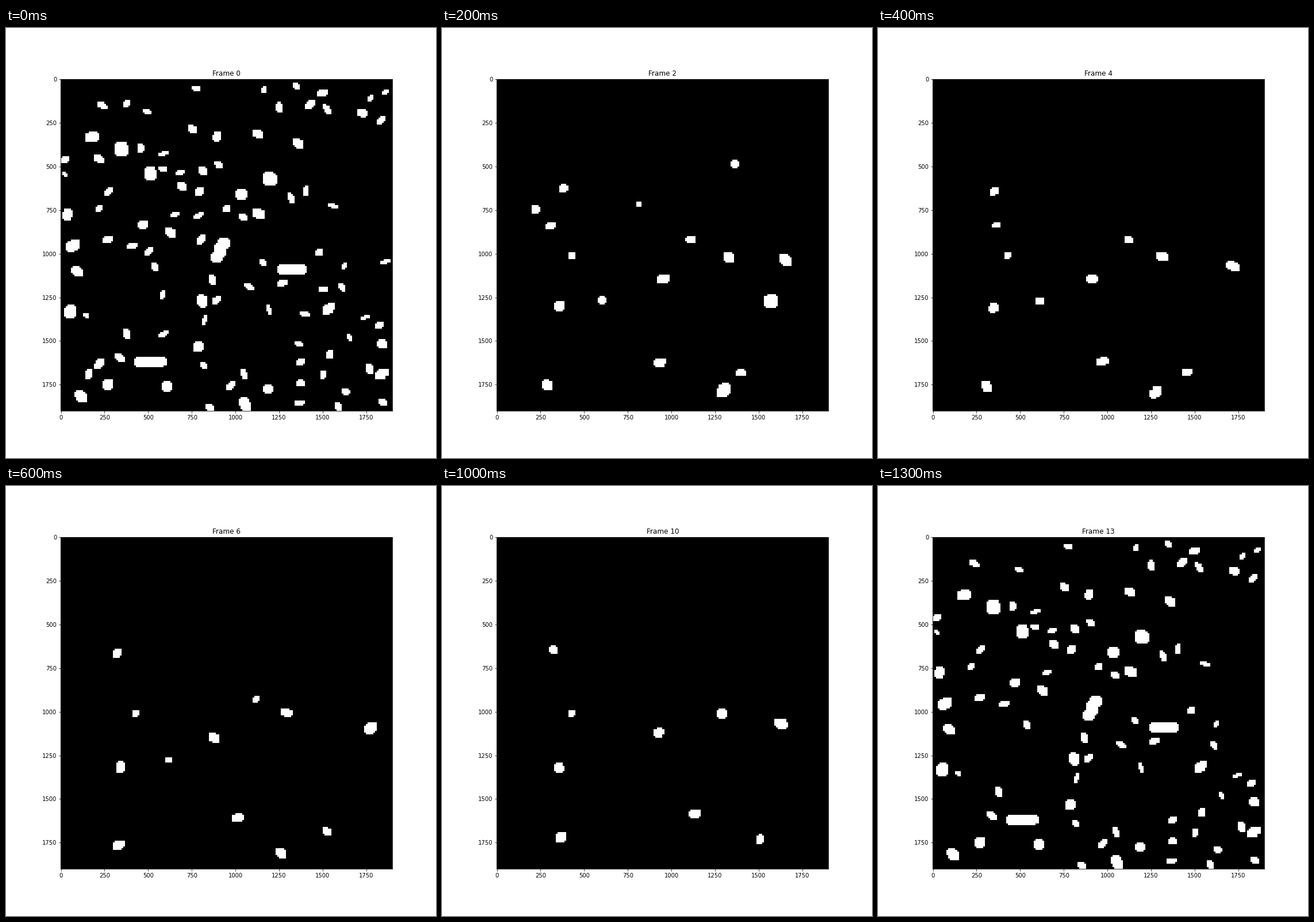
Write a matplotlib script that moves like this. It is 748x748 px and loops after 1.4 s.

```python
import numpy as np
import matplotlib.pyplot as plt
from matplotlib.animation import FuncAnimation

STAGE, DPI = 748, 72
GRID, CELL = 190, 10
FRAMES, INTERVAL = 14, 100
SEED, CROWD, DEPARTED, GAP = 5, 86, 13, 8

# Key points, in grid cells
LARGE = [(35, 40), (51, 54), (4, 78), (5, 133), (11, 182), (105, 186), (184, 169),
         (154, 132), (18, 33), (120, 57), (104, 66), (114, 77), (27, 175),
         (7, 95), (10, 110), (81, 127)]
CHAINS = [((93, 94), (90, 102)), ((127, 109), (138, 109)), ((46, 162), (57, 162))]

rows, cols = np.mgrid[:GRID, :GRID] + 0.5


def blob(mask, rng, center, size, tilt=0.0):
    """Fill a ragged, blocky ellipse; positive tilt leans like a backslash."""
    w, h = np.maximum(np.rint(size), 1)
    x, y = np.rint(np.subtract(center, (w / 2, h / 2)))
    u = (cols - x) / w * 2 - 1
    v = (rows - y) / h * 2 - 1
    limit = (1 - tilt * tilt) * rng.uniform(1.0, 1.4, mask.shape)
    mask |= (u * u - 2 * tilt * u * v + v * v <= limit) & (abs(u) < 1) & (abs(v) < 1)


def spread(rng, count, taken):
    """Random points that keep a minimum gap to each other and to taken ones."""
    points = list(taken)
    while len(points) < len(taken) + count:
        p = rng.uniform(2, GRID - 2, 2)
        if min(np.hypot(*np.subtract(points, p).T)) > GAP:
            points.append(p)
    return points[len(taken):]


def crowd(count):
    rng = np.random.default_rng(SEED)
    mask = np.zeros((GRID, GRID), bool)
    links = [np.linspace(a, b, 4) for a, b in CHAINS]
    for p in LARGE:
        blob(mask, rng, p, rng.uniform(6, 8, 2), rng.uniform(-0.4, 0.4))
    for chain in links:
        for p in chain:
            blob(mask, rng, p, (7, 6))
    for p in spread(rng, CROWD, LARGE + [p for c in links for p in c])[:count]:
        shape = np.random.default_rng([int(n) for n in p])
        blob(mask, shape, p, shape.uniform(3, 6.4, 2), shape.uniform(-0.6, 0.6))
    return mask


class Mover:
    """Cell drifting through evenly timed points; it stretches along its course."""

    def __init__(self, size, end, *points):
        self.size, self.end = size, end
        self.points = np.array(points, float)
        self.times = np.linspace(2, min(end, 10), len(points))

    def at(self, frame):
        return np.array([np.interp(frame, self.times, axis) for axis in self.points.T])

    def draw(self, mask, frame):
        if frame > self.end:
            return
        rng = np.random.default_rng([self.size, frame])
        vx, vy = self.at(frame + 1) - self.at(frame - 1)
        speed = np.hypot(vx, vy) + 0.5
        stretch = 0.2 * (abs(vx) - abs(vy)) / speed
        fade = 1 - 0.4 * (frame - 2) / self.end if self.end < 10 else 1
        size = self.size * fade * np.array([1 + stretch, 1 - stretch])
        blob(mask, rng, self.at(frame), size, np.clip(vx * vy / speed**2, -0.5, 0.5))


MOVERS = [
    Mover(5, 12, (38, 63), (33, 66), (32, 65)),
    Mover(4, 12, (43, 101), (43, 101)),
    Mover(6, 12, (36, 130), (34, 131), (36, 132)),
    Mover(6, 12, (29, 175), (33, 177), (37, 172)),
    Mover(6, 12, (95, 114), (88, 115), (93, 112)),
    Mover(6, 12, (133, 102), (130, 101), (129, 101)),
    Mover(7, 12, (166, 104), (177, 110), (163, 107)),
    Mover(6, 12, (93, 163), (101, 160), (113, 159)),
    Mover(5, 12, (140, 168), (152, 168), (151, 173)),
    Mover(8, 8, (130, 178), (126, 181), (127, 182)),
    Mover(5, 8, (111, 92), (113, 92), (109, 95)),
    Mover(5, 6, (61, 127), (62, 127)),
    Mover(5, 4, (31, 84), (36, 84)),
    Mover(5, 2, (23, 74)),
    Mover(5, 2, (136, 49)),
    Mover(8, 2, (157, 127)),
    Mover(3, 2, (81, 72)),
]


def scene(frame):
    if frame == 0:
        return crowd(CROWD)
    if frame == FRAMES - 1:
        return crowd(CROWD - DEPARTED)
    mask = np.zeros((GRID, GRID), bool)
    for mover in MOVERS:
        mover.draw(mask, frame)
    return mask


fig = plt.figure(figsize=(STAGE / DPI, STAGE / DPI), dpi=DPI)
ax = fig.add_axes(np.array([95.47, 82.37, 576.58, 576.58]) / STAGE)
span = GRID * CELL - 0.5
image = ax.imshow(scene(0), cmap="gray", vmin=0, vmax=1, interpolation="nearest",
                  extent=(-0.5, span, span, -0.5))
title = ax.set_title("Frame 0")


def update(frame):
    image.set_data(scene(frame))
    title.set_text(f"Frame {frame}")
    return image, title


anim = FuncAnimation(fig, update, frames=FRAMES, interval=INTERVAL,
                     repeat=True, repeat_delay=0, blit=False)
plt.show()
```
